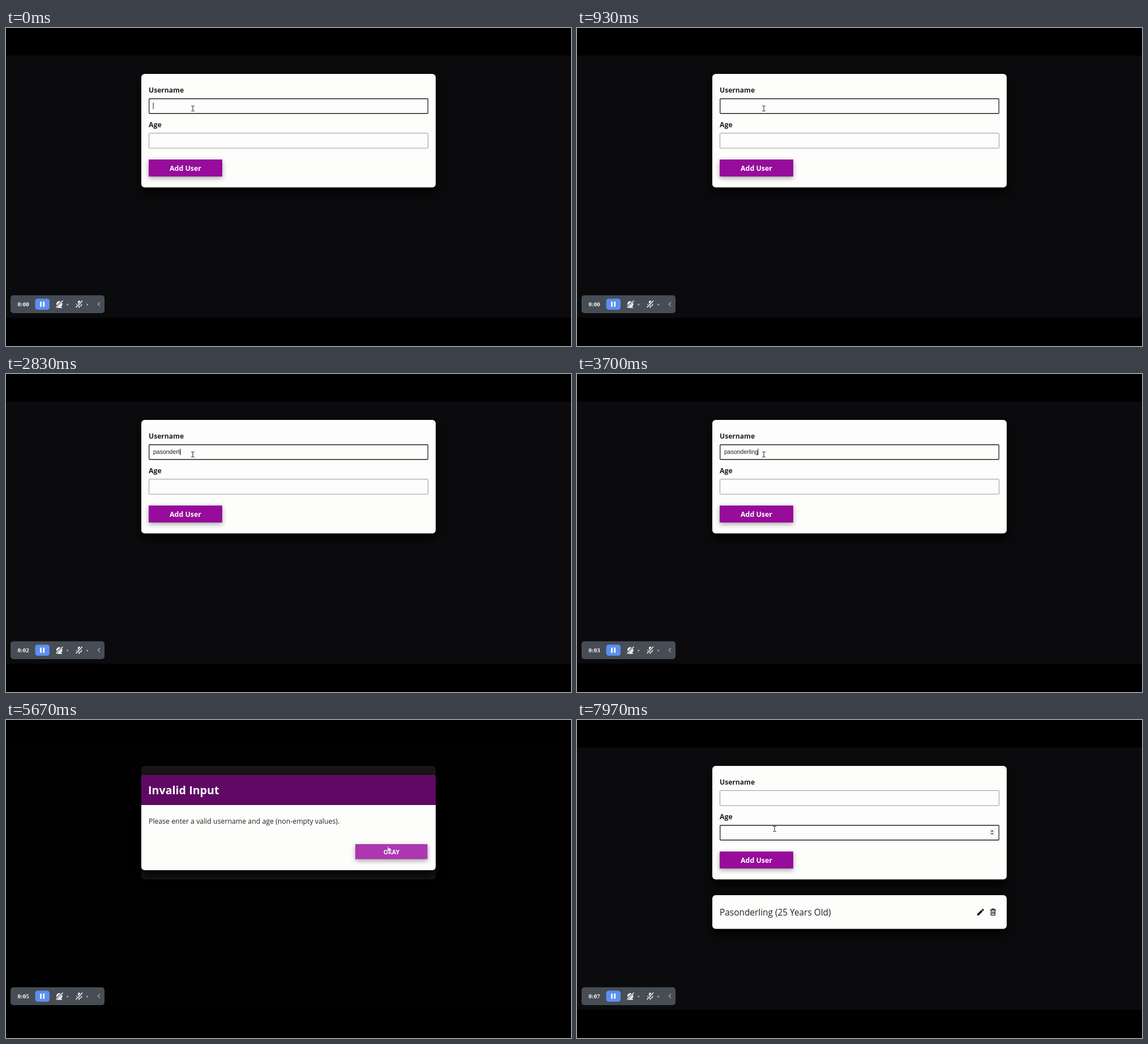
An HTML page for the animation above (8 s loop, 998 by 561 pixels).

```html
<!DOCTYPE html>
<html lang="en">
<head>
<meta charset="utf-8">
<title>Add user form</title>
<style>
  html, body { margin: 0; width: 100%; height: 100%; overflow: hidden; background: #000; }
  svg { display: block; }
  text { font-family: "Open Sans", "Noto Sans", sans-serif; fill: #222; white-space: pre; }
  .bold { font-weight: 700; }
  .white { fill: #fff; }
  .typed { font: 10.5px "Liberation Sans", Arial, sans-serif; fill: #222; }
  .card { fill: #fdfdfc; filter: drop-shadow(0 8px 8px #000); }
  .button { fill: #970c9b; filter: drop-shadow(0 3px 4px rgba(0, 0, 0, .35)); }
  .field { fill: #fdfdfc; stroke: #98989d; stroke-width: 1; }
  .field.focus { stroke: #222; stroke-width: 1.3; }
  .hover { fill: #ad37b0; }
</style>
</head>
<body>
<svg width="998" height="561" viewBox="0 0 998 561">
  <rect y="48.5" width="998" height="462.5" fill="#0b0b0d"/>

  <rect class="card" x="239" y="81" width="520" height="200.3" rx="6"/>
  <text class="bold" x="252" y="114.3" font-size="12.1">Username</text>
  <rect id="nameField" class="field" rx="1"/>
  <text id="nameText" class="typed" x="260" y="141"></text>
  <text class="bold" x="252" y="175.2" font-size="12.3">Age</text>
  <rect id="ageField" class="field" rx="1"/>
  <text id="ageText" class="typed" x="260" y="202.3"></text>
  <g id="spinner">
    <rect x="728" y="192" width="10.5" height="12.5" fill="#efefef"/>
    <path d="M730.7 197l2.5-2.8 2.5 2.8zM730.7 199.5l2.5 2.8 2.5-2.8z" fill="#444"/>
  </g>
  <rect id="caret" width="1" height="11.5" fill="#222"/>
  <rect class="button" x="252" y="232" width="130" height="30"/>
  <text class="bold white" x="317" y="252.2" font-size="12.4" text-anchor="middle">Add User</text>

  <g id="listItem">
    <rect class="card" x="239" y="309" width="520" height="59.5" rx="6"/>
    <text x="252" y="344.8" font-size="15.4">Pasonderling (25 Years Old)</text>
    <path transform="translate(705 331) scale(.66)" d="M3 17.25V21h3.75L17.81 9.94l-3.75-3.75zM20.71 7.04a1 1 0 0 0 0-1.41l-2.34-2.34a1 1 0 0 0-1.41 0l-1.83 1.83 3.75 3.75z"/>
    <path d="M731.4 336v7.5q0 1 1 1h5q1 0 1-1v-7.5M729.8 335.2h10.4M733 335v-1.6h4v1.6M733.8 337.5v5M736.2 337.5v5" fill="none" stroke="#000" stroke-width="1.2"/>
  </g>

  <g id="modal">
    <rect y="48" width="998" height="463" opacity=".91"/>
    <rect class="card" x="239" y="97" width="520" height="168" rx="6"/>
    <path d="M239 150v-47q0-6 6-6h508q6 0 6 6v47z" fill="#5f0964"/>
    <text class="bold white" x="251" y="131.2" font-size="19.7">Invalid Input</text>
    <text x="252" y="182.5" font-size="12.3">Please enter a valid username and age (non-empty values).</text>
    <rect id="okay" class="button" x="617" y="219" width="127.5" height="26.5"/>
    <text class="bold white" x="680.8" y="236.6" font-size="10.4" text-anchor="middle">OKAY</text>
  </g>

  <g id="recorder">
    <rect x="8" y="471.5" width="166" height="31.5" rx="5" fill="#474d54"/>
    <text id="clock" x="20.5" y="491" class="white" style="font: bold 11px 'Liberation Serif', 'Times New Roman', serif"></text>
    <rect x="51.5" y="477.5" width="25.5" height="19.5" rx="4.5" fill="#5b8ff0"/>
    <path d="M60 482.8h2.8v9h-2.8zM65.3 482.8h2.8v9h-2.8z" fill="#fff"/>
    <circle cx="94.3" cy="487" r="5.3" fill="#fff"/>
    <path d="M90 493h9" stroke="#fff" stroke-width="1.6"/>
    <rect x="127" y="481" width="4.6" height="8" rx="2.3" fill="#fff"/>
    <path d="M124.8 486.5q0 4.5 4.5 4.5t4.5-4.5M129.3 491v3" fill="none" stroke="#fff" stroke-width="1.2"/>
    <path d="M88.5 492.5l11-11M123.5 492.5l11-11" stroke="#474d54" stroke-width="3.2"/>
    <path d="M88.5 493l12-12M123.5 493l11.5-12" stroke="#fff" stroke-width="1.4"/>
    <path d="M106.5 486.8h4.4l-2.2 3.2zM141.5 486.8h4.4l-2.2 3.2z" fill="#a9adb2"/>
    <path d="M166 483.5l-3.7 3.7 3.7 3.7" fill="none" stroke="#a9adb2" stroke-width="1.3"/>
  </g>

  <g id="pointer">
    <path id="beam" d="M-3-4.5h2.2l.8.6.8-.6h2.2M0-4v8M-3 4.5h2.2l.8-.6.8.6h2.2" fill="none" stroke="#4d3560" stroke-width="1.2"/>
    <path id="arrow" d="M0 0v11l2.6-2.4 1.8 4 1.8-.8-1.8-3.9h3.5z" fill="#fff" stroke="#222" stroke-width=".7"/>
    <path id="hand" d="M-2.2 1.5v-6.2q1-1.2 2 0v3l3.6 1q1 .5.8 1.6l-.7 4h-4.8l-3-4q.4-1.4 2.1.6z" fill="#f4e4f6" stroke="#75247a" stroke-width=".8"/>
  </g>
</svg>
<script>
const LOOP = 8000, BLINK = 530;
const NAME = "pasonderling", AGE = "25";
const OPEN = 4000, CLOSE = 5750, AGE_FOCUS = 6420, SUBMIT = 7560;
const nameKeys = [...NAME].map((_, i) => i < 5 ? 1250 + i * 120 : 1950 + (i - 5) * 216);
const ageKeys = [6920, 7200];
// Pointer stops: time, x, y
const route = [[4250, 330, 142], [4950, 676, 227], [5790, 676, 227], [6200, 349, 189], [6300, 349, 189], [6400, 349, 192]];

const $ = id => document.getElementById(id);
const show = (id, on) => $(id).style.display = on ? "" : "none";
const typedCount = (keys, t) => keys.filter(k => k <= t).length;

function pointerAt(t) {
  const next = route.findIndex(p => p[0] > t);
  if (next <= 0) return (next ? route[route.length - 1] : route[0]).slice(1);
  const [a, b] = [route[next - 1], route[next]];
  const u = (t - a[0]) / (b[0] - a[0]), e = u * u * (3 - 2 * u);
  return [a[1] + (b[1] - a[1]) * e, a[2] + (b[2] - a[2]) * e];
}

function setField(id, focused, top) {
  const field = $(id), inset = focused ? .75 : .5;
  field.classList.toggle("focus", focused);
  field.setAttribute("x", 252 + inset);
  field.setAttribute("y", top + inset);
  field.setAttribute("width", 494 - 2 * inset);
  field.setAttribute("height", 27.5 - 2 * inset);
}

function draw(t) {
  const nameFocus = t < OPEN, ageFocus = t >= AGE_FOCUS, modal = t >= OPEN && t < CLOSE;
  $("nameText").textContent = t < SUBMIT ? NAME.slice(0, typedCount(nameKeys, t)) : "";
  $("ageText").textContent = t < SUBMIT ? AGE.slice(0, typedCount(ageKeys, t)) : "";
  setField("nameField", nameFocus, 124);
  setField("ageField", ageFocus, 185);

  const lastKey = [0, ...nameKeys, AGE_FOCUS, ...ageKeys].filter(k => k <= t).pop();
  const text = $(ageFocus ? "ageText" : "nameText");
  show("caret", (nameFocus || ageFocus) && (t - lastKey) % (2 * BLINK) < BLINK);
  $("caret").setAttribute("x", 259.6 + (text.textContent ? text.getComputedTextLength() - .5 : 0));
  $("caret").setAttribute("y", ageFocus ? 193 : 131.7);

  const [x, y] = pointerAt(t);
  const inside = (left, top, right, bottom) => x > left && x < right && y > top && y < bottom;
  const overAge = !modal && inside(252, 185, 746, 213);
  const overName = !modal && inside(252, 124, 746, 152);
  const overOkay = modal && inside(617, 219, 745, 246);
  show("spinner", overAge || ageFocus);
  show("beam", overAge || overName);
  show("hand", overOkay);
  show("arrow", !overAge && !overName && !overOkay);
  $("okay").classList.toggle("hover", overOkay);
  $("pointer").setAttribute("transform", `translate(${x} ${y})`);

  show("modal", modal);
  show("listItem", t >= SUBMIT);
  $("clock").textContent = "0:0" + Math.floor(t / 1000);
}

function tick() {
  draw(performance.now() % LOOP);
  requestAnimationFrame(tick);
}
tick();
</script>
</body>
</html>
```
